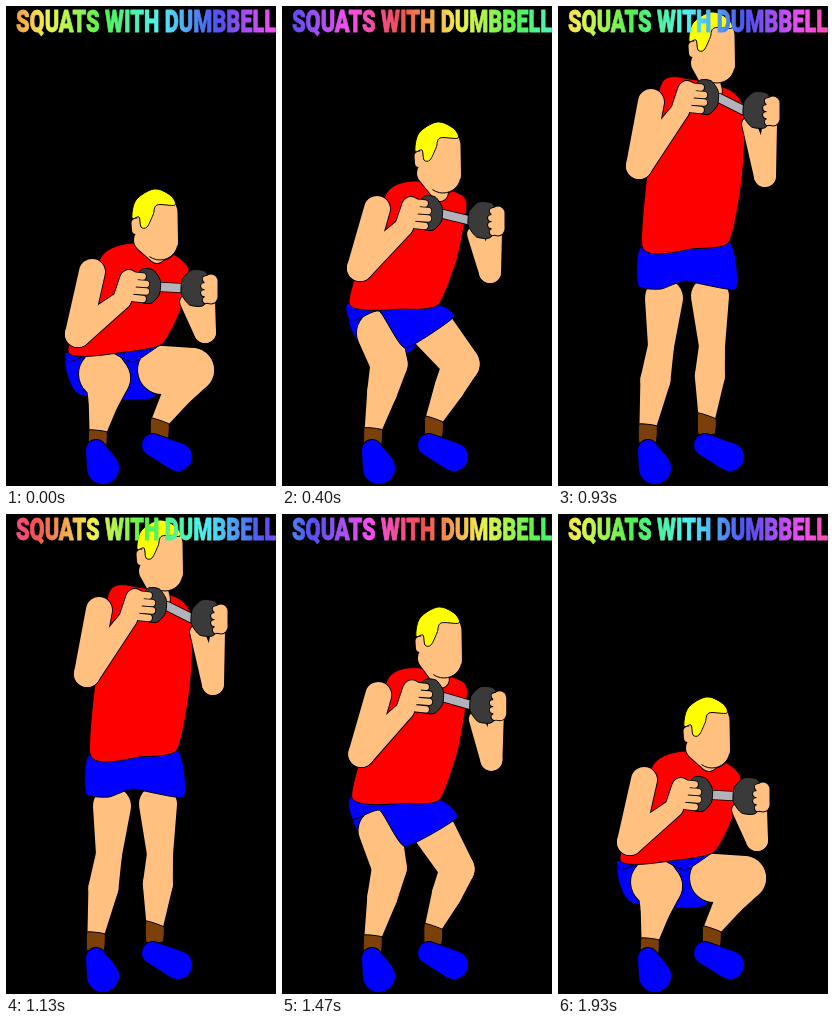
Animation of 270 by 480 pixels, one loop 1990 ms. Source, as an HTML page with a canvas:

```html
<!DOCTYPE html>
<html lang="en">
<head>
<meta charset="utf-8">
<title>Squats with dumbbell</title>
<style>
html, body { margin: 0; width: 100%; height: 100%; overflow: hidden; background: #000; }
canvas { display: block; width: 270px; height: 480px; }
</style>
</head>
<body>
<canvas id="stage"></canvas>
<script>
const W = 270, H = 480, LOOP = 1990, FRAME = 200 / 3, TAU = Math.PI * 2;
const SKIN = '#ffc080', RED = '#f00', BLUE = '#00f', YELLOW = '#ff0',
  BROWN = '#7b3f0a', IRON = '#3a3a3a', STEEL = '#b2b2ba';

const canvas = document.getElementById('stage');
const ctx = canvas.getContext('2d');
const ratio = window.devicePixelRatio || 1;
canvas.width = W * ratio;
canvas.height = H * ratio;

// Joint positions standing, half way down and in the deep squat
const HALF = 0.62;
const joints = {
  head:    [[155, 43], [157, 153], [150, 220]],
  armL:    [[93, 96], [95, 203], [86, 266]],
  elbowL:  [[81, 160], [78, 262], [72, 328]],
  shoulderR: [[187, 105], [185, 198], [183, 264]],
  elbowR:  [[207, 170], [208, 266], [199, 326]],
  weightL: [[147, 91], [147, 207], [141, 280]],
  weightR: [[201, 104], [202, 214], [191, 282]],
  waistL:  [[84, 240], [67, 297], [62, 346]],
  waistR:  [[171, 236], [156, 299], [156, 338]],
  hemL:    [[80, 280], [69, 316], [64, 356]],
  hemMid:  [[103, 283], [97, 305], [97, 343]],
  crotch:  [[127, 275], [123, 342], [127, 356]],
  hemR:    [[178, 283], [172, 311], [158, 336]],
  hipL:    [[106, 292], [97, 327], [97, 368]],
  hipR:    [[152, 290], [151, 324], [156, 364]],
  kneeL:   [[103, 340], [107, 358], [102, 372]],
  kneeR:   [[154, 340], [179, 358], [186, 364]]
};

// Squat depth at key steps of the thirty in one loop
const rhythm = [[0, 1], [6, 0.62], [10, 0.11], [13, 0], [17, 0], [22, 0.49], [25, 0.72], [29, 1]];

// Monotone cubic through the rhythm, resting at turning points
function depthAt(step) {
  const slope = k => (rhythm[k + 1][1] - rhythm[k][1]) / (rhythm[k + 1][0] - rhythm[k][0]);
  const tangent = k => {
    if (k === 0 || k === rhythm.length - 1) return 0;
    const a = slope(k - 1), b = slope(k);
    return a * b <= 0 ? 0 : 2 * a * b / (a + b);
  };
  let k = 0;
  while (k < rhythm.length - 2 && step >= rhythm[k + 1][0]) k++;
  const [x0, y0] = rhythm[k], [x1, y1] = rhythm[k + 1];
  const span = x1 - x0, u = (step - x0) / span, v = 1 - u;
  return v * v * (1 + 2 * u) * y0 + u * u * (3 - 2 * u) * y1
    + span * u * v * (v * tangent(k) - u * tangent(k + 1));
}

// Each joint follows a parabola through its three positions
function poseAt(d) {
  const stand = (d - HALF) * (d - 1) / HALF;
  const half = d * (1 - d) / (HALF * (1 - HALF));
  const deep = d * (d - HALF) / (1 - HALF);
  const pose = {};
  for (const name in joints) {
    const [a, b, c] = joints[name];
    pose[name] = [0, 1].map(i => a[i] * stand + b[i] * half + c[i] * deep);
  }
  return pose;
}

const add = (p, x, y) => [p[0] + x, p[1] + y];
const mix = (p, q, t) => [p[0] + (q[0] - p[0]) * t, p[1] + (q[1] - p[1]) * t];
const ball = (p, r) => [...p, r];

// Smooth closed outline through points
function patch(color, pts, bend = 0.1) {
  const n = pts.length, at = i => pts[(i + n) % n];
  ctx.beginPath();
  ctx.moveTo(...at(0));
  for (let i = 0; i < n; i++) {
    const [a, b, c, d] = [at(i - 1), at(i), at(i + 1), at(i + 2)];
    ctx.bezierCurveTo(b[0] + (c[0] - a[0]) * bend, b[1] + (c[1] - a[1]) * bend,
      c[0] - (d[0] - b[0]) * bend, c[1] - (d[1] - b[1]) * bend, ...c);
  }
  ctx.fillStyle = color;
  ctx.fill();
  ctx.lineWidth = 1;
  ctx.strokeStyle = '#000';
  ctx.stroke();
}

// Hull of two circles
function capsule([x1, y1, r1], [x2, y2, r2]) {
  const path = new Path2D();
  const dir = Math.atan2(y2 - y1, x2 - x1);
  const dist = Math.hypot(x2 - x1, y2 - y1) || 1;
  const open = Math.acos(Math.max(-1, Math.min(1, (r1 - r2) / dist)));
  path.arc(x1, y1, r1, dir + open, dir - open + TAU);
  path.arc(x2, y2, r2, dir - open, dir + open);
  path.closePath();
  return path;
}

// Chains of balls merged into one outlined body
function body(color, ...chains) {
  const hulls = chains.flatMap(c => c.slice(1).map((b, i) => capsule(c[i], b)));
  ctx.strokeStyle = '#000';
  ctx.lineWidth = 1.8;
  hulls.forEach(h => ctx.stroke(h));
  ctx.fillStyle = color;
  hulls.forEach(h => ctx.fill(h));
}

function leg(hip, knee, ankle, d) {
  body(SKIN, [ball(hip, 19 + 5 * d), ball(knee, 13 + 9 * d),
    ball(mix(knee, ankle, 0.43), 15), ball(ankle, 8.5)]);
}

function sock([x, y], tilt) {
  patch(BROWN, [[x - 9, y - tilt], [x + 9, y + tilt], [x + 8, y + 18], [x - 9, y + 18]], 0.05);
}

function weight([x, y], rx, ry) {
  const pts = Array.from({ length: 8 }, (_, i) => {
    const a = (i + 0.6) * TAU / 8;
    return [x + rx * Math.cos(a), y + ry * Math.sin(a)];
  });
  patch(IRON, pts, 0.11);
}

function handle(from, to) {
  ctx.lineCap = 'round';
  for (const [color, width] of [['#000', 10], [STEEL, 8.4]]) {
    ctx.strokeStyle = color;
    ctx.lineWidth = width;
    ctx.beginPath();
    ctx.moveTo(...from);
    ctx.lineTo(...to);
    ctx.stroke();
  }
  ctx.lineCap = 'butt';
}

// Four fingers lying across a weight
const fingers = (p, root, reach, gap, r) => [0, 1, 2, 3].map(i => {
  const y = (i - 1.4) * gap;
  const tip = root + reach * (i % 3 ? 1 : 0.75);
  return [ball(add(p, root, y), r), ball(add(p, tip, y + 1), r)];
});

function head(p, collar) {
  const jaw = add(p, 4, 16);
  body(SKIN,
    [ball(add(p, -10, 14), 12), ball(add(collar, 24, 12), 8)],
    [ball(add(p, -20, -3), 4.5), ball(add(p, -20, 4), 4)],
    [ball(add(p, 1, -13), 20.5), ball(jaw, 18)]);
  ctx.beginPath();
  ctx.arc(...jaw, 18, 0.2, 2.2);
  ctx.lineWidth = 1;
  ctx.stroke();
  const hair = [[-24, -8], [-20, -26], [-2, -37], [14, -31], [19, -21],
    [1, -21], [-3, -11], [-9, 1], [-15, 1], [-17, -9]];
  patch(YELLOW, hair.map(([x, y]) => add(p, x, y)), 0.16);
}

function title(step) {
  const squeeze = 0.68;
  const rainbow = ctx.createLinearGradient(0, 0, 260 / squeeze, 0);
  for (let i = 0; i <= 24; i++) {
    const hue = 748 - 24 * step + 275 * i / 24;
    rainbow.addColorStop(i / 24, `hsl(${hue % 360}, 88%, 63%)`);
  }
  ctx.save();
  ctx.translate(10, 25.5);
  ctx.scale(squeeze, 1);
  ctx.font = '900 32px Roboto, "Liberation Sans", sans-serif';
  ctx.fillStyle = ctx.strokeStyle = rainbow;
  ctx.lineWidth = 0.8;
  ctx.fillText('SQUATS WITH DUMBBELL', 0, 0);
  ctx.strokeText('SQUATS WITH DUMBBELL', 0, 0);
  ctx.restore();
}

function render(step) {
  ctx.setTransform(ratio, 0, 0, ratio, 0, 0);
  ctx.lineJoin = 'round';
  ctx.fillStyle = '#000';
  ctx.fillRect(0, 0, W, H);

  const d = depthAt(step), p = poseAt(d);
  const collar = add(p.head, -23, 30 - 13 * d);
  const ankleL = [90 + 2 * d, 419 + 6 * d], ankleR = [149 + 5 * d, 410 + 5 * d];

  // Shorts seen behind the thighs
  patch(BLUE, [p.waistL, p.waistR, add(p.crotch, 20 * d ** 4, 36 * d ** 4),
    add(p.hemL, 8, 4 + 28 * d)]);

  leg(p.hipR, p.kneeR, ankleR, d);
  leg(p.hipL, p.kneeL, ankleL, d);
  sock(ankleL, 1);
  sock(ankleR, 3);
  body(BLUE, [[90, 444, 10], [97, 462, 16]]);
  body(BLUE, [[147, 439, 11], [172, 451, 14]]);

  patch(BLUE, [p.waistL, p.waistR, p.hemR, p.crotch, p.hemMid, p.hemL], 0.08);
  patch(RED, [add(p.armL, 9, -15), collar, add(collar, 40, 11), p.shoulderR,
    add(mix(p.shoulderR, p.waistR, 0.5), 5, 3), p.waistR,
    add(mix(p.waistL, p.waistR, 0.6), 0, 5), p.waistL]);
  head(p.head, collar);

  const wristL = add(p.weightL, -25, 14), wristR = add(p.weightR, 11, 13);
  body(SKIN, [ball(add(p.weightR, -10, 14), 7), ball(p.elbowR, 11), ball(wristR, 7)]);
  handle(add(p.weightL, 14, 1), add(p.weightR, -16, 0));
  weight(p.weightL, 14, 18);
  weight(p.weightR, 16.5, 19);
  body(SKIN, [ball(add(p.weightR, 14, -7), 6.5), ball(add(p.weightR, 14, 9), 6.5)],
    ...fingers(p.weightR, 14, -7, 7, 2.9));
  body(SKIN, [ball(p.armL, 13), ball(p.elbowL, 13), ball(wristL, 9)],
    [ball(add(p.weightL, -18, -7), 9), ball(wristL, 9)],
    ...fingers(p.weightL, -14, 13, 7.5, 3.2));

  title(step);
}

const start = performance.now();
function tick() {
  const t = (performance.now() - start) % LOOP;
  render(Math.floor((Math.floor(t / 10) * 10 + 4) / FRAME));
  requestAnimationFrame(tick);
}
tick();
</script>
</body>
</html>
```
